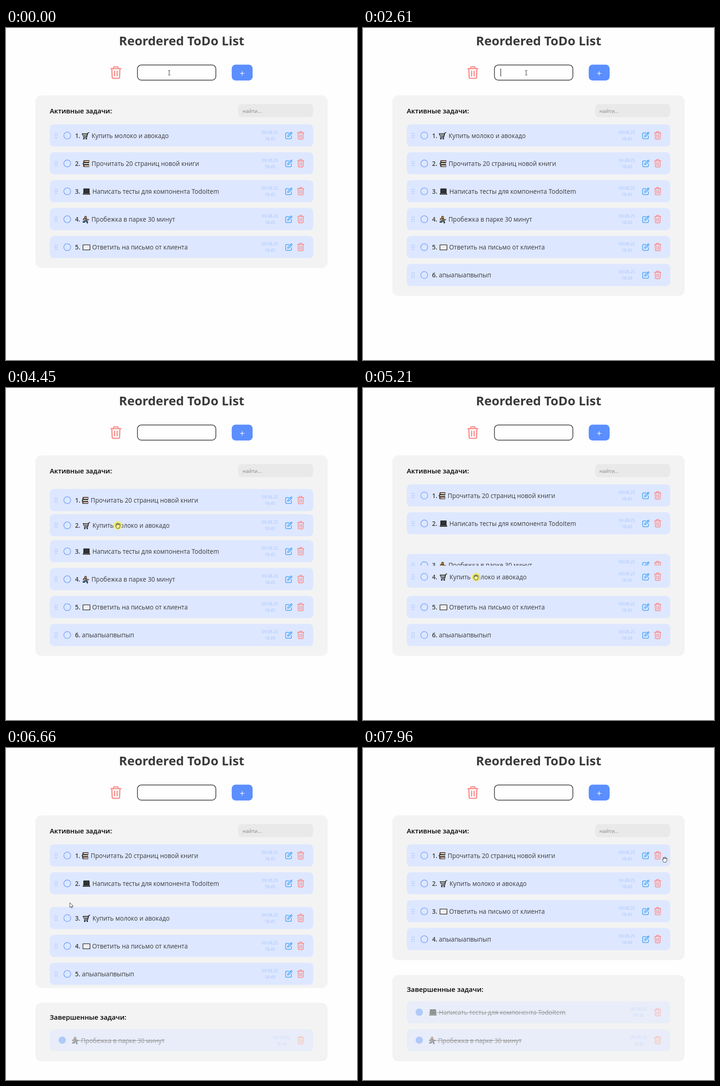
These frames come from a looping animation (770 by 727 pixels, 8 s). An HTML page with a canvas:

```html
<!DOCTYPE html>
<html lang="ru">
<head>
<meta charset="utf-8">
<title>Reordered ToDo List</title>
<style>
html, body { margin: 0; width: 100%; height: 100%; overflow: hidden; background: #fefefe; }
canvas { display: block; width: 770px; height: 727px; }
</style>
</head>
<body>
<canvas id="stage"></canvas>
<script>
const W = 770, H = 727, LOOP = 8000;
const canvas = document.getElementById('stage');
const ctx = canvas.getContext('2d');
const dpr = window.devicePixelRatio || 1;
canvas.width = W * dpr;
canvas.height = H * dpr;

const FAMILY = '"Open Sans", "Noto Sans", sans-serif';
const INK = '#3a3a3a', BLUE = '#5b8fff', RED = '#fb8f8f', PANEL = '#f3f3f3', ROW = '#dde7ff';
const ROW_H = 48.4, PITCH = 61.1, TOP = 147;
const TYPED = 'апыапыапвыпып';

const ADD = 2610, GRAB = 3900, DROP = 5550, SETTLED = 5850;
const SWAPS = [4214, 4680, 5061], CHECK_RUN = 6452, CHECK_TESTS = 7330;

// moves: [time, new slot]
const tasks = [
  { name: 'Купить молоко и авокадо', icon: cart, gap: 21.8, slot: 0, drag: true,
    moves: [[SWAPS[0], 1], [SWAPS[1], 2], [SWAPS[2], 3], [CHECK_RUN, 2], [CHECK_TESTS, 1]] },
  { name: 'Прочитать 20 страниц новой книги', icon: books, gap: 19.8, slot: 1, moves: [[SWAPS[0], 0]] },
  { name: 'Написать тесты для компонента TodoItem', icon: laptop, gap: 21.4, slot: 2,
    moves: [[SWAPS[1], 1]], done: CHECK_TESTS },
  { name: 'Пробежка в парке 30 минут', icon: runner, gap: 19.4, slot: 3,
    moves: [[SWAPS[2], 2]], done: CHECK_RUN, bin: '#fb9f84' },
  { name: 'Ответить на письмо от клиента', icon: envelope, gap: 21, slot: 4,
    moves: [[CHECK_RUN, 3], [CHECK_TESTS, 2]] },
  { name: TYPED, gap: -1.6, slot: 5, added: ADD, clock: '18:49',
    moves: [[CHECK_RUN, 4], [CHECK_TESTS, 3]] }
];

const dragPath = [[GRAB, 211], [4030, 224.5], [4217, 248], [4443, 276.3], [4870, 338],
  [5202, 389], [5320, 401], [DROP, 402]];
const pointerPath = [[3270, 358, 98], [3780, 245, 236], [GRAB, 245, 236], [4030, 245, 249.5],
  [4443, 245.5, 301], [5202, 248, 414], [5320, 248, 426], [5620, 248, 427], [5900, 150, 385],
  [6100, 150, 385], [6340, 135, 358], [CHECK_RUN, 135, 357], [6651, 139.5, 338.5], [6870, 136, 305],
  [7000, 135, 298], [7200, 135, 298], [CHECK_TESTS, 142, 296], [7479, 337.5, 287], [7960, 662, 244]];

function track(keys, t) {
  if (t <= keys[0][0]) return keys[0].slice(1);
  for (let i = 1; i < keys.length; i++) {
    const a = keys[i - 1], b = keys[i];
    if (t < b[0]) {
      const p = (t - a[0]) / (b[0] - a[0]);
      return a.slice(1).map((v, k) => v + (b[k + 1] - v) * p);
    }
  }
  return keys[keys.length - 1].slice(1);
}

// cubic-bezier(.4, 0, .1, 1)
function ease(x) {
  if (x <= 0) return 0;
  if (x >= 1) return 1;
  let lo = 0, hi = 1, s = 0.5;
  for (let i = 0; i < 24; i++) {
    s = (lo + hi) / 2;
    const u = 1 - s;
    if (1.2 * u * u * s + 0.3 * u * s * s + s * s * s < x) lo = s; else hi = s;
  }
  return s * s * (3 - 2 * s);
}

const slotY = slot => 211 + slot * PITCH;

function place(task, t) {
  let slot = task.slot, y = slotY(slot);
  for (const [start, next] of task.moves) {
    if (t < start) break;
    y = slotY(slot) + (slotY(next) - slotY(slot)) * ease((t - start) / 450);
    slot = next;
  }
  if (task.drag && t < SETTLED) {
    y = track(dragPath, t)[0];
    if (t > DROP) y += (slotY(slot) - y) * ease((t - DROP) / (SETTLED - DROP));
  }
  return { slot, y };
}

function box(x, y, w, h, r, fill) {
  ctx.beginPath();
  ctx.roundRect(x, y, w, h, r);
  ctx.fillStyle = fill;
  ctx.fill();
}

function text(str, x, y, size, color, weight = 400, align = 'left') {
  ctx.font = `${weight} ${size}px ${FAMILY}`;
  ctx.textAlign = align;
  ctx.fillStyle = color;
  ctx.fillText(str, x, y);
}

function dot(x, y, r, fill) {
  ctx.beginPath();
  ctx.arc(x, y, r, 0, Math.PI * 2);
  ctx.fillStyle = fill;
  ctx.fill();
}

function shape(d, stroke, width = 1, fill) {
  const path = new Path2D(d);
  if (fill) { ctx.fillStyle = fill; ctx.fill(path); }
  if (stroke) { ctx.strokeStyle = stroke; ctx.lineWidth = width; ctx.stroke(path); }
}

function at(x, y, draw, scale = 1) {
  ctx.save();
  ctx.translate(x, y);
  ctx.scale(scale, scale);
  ctx.lineCap = ctx.lineJoin = 'round';
  draw();
  ctx.restore();
}

function trash(color = RED) {
  shape('M-7 -5.5H7M-3.8 -5.6L-2.5 -8.1H2.5L3.8 -5.6M-5.7 -5.3L-5.2 6.3Q-5.1 8.1 -3.4 8.1H3.4Q5.1 8.1 5.2 6.3L5.7 -5.3M-1.8 -2V4.8M1.8 -2V4.8', color, 1.7);
}

function pencil() {
  shape('M0 -5.6H-4.6Q-7 -5.6 -7 -3.2V5Q-7 7.4 -4.6 7.4H3.4Q5.7 7.4 5.7 5V1M-2.6 2.9L-1.9 -.3L4.4 -6.6Q5.4 -7.5 6.5 -6.5T6.6 -4.4L.4 2Z M3 -5.2L5.2 -3', '#47a3f7', 1.5);
}

// Task icons, each in a 16 x 16 cell
function cart() {
  shape('M1 3.5H13L11.3 9H3.4Z', '#222', 1.3, '#777');
  shape('M4.2 4V8.6M7 4V8.6M9.8 4V8.6M2 6.2H12', '#ddd', 0.7);
  shape('M16 1L13.6 1.8L11 11.8H3.6', '#222', 1.5);
  dot(4.8, 14.4, 1.6, '#222');
  dot(10.2, 14.4, 1.6, '#222');
}

function books() {
  [['#c4643a', 2.2], ['#6c8a5e', 0.8], ['#c4643a', 1.8]].forEach(([color, x], i) => {
    const y = 1.2 + i * 4.7;
    shape(`M${x + 12} ${y}H${x + 1}Q${x - 0.8} ${y + 2} ${x + 1} ${y + 4}H${x + 12}Z`, '#1c1c1c', 1.3, color);
    shape(`M${x + 3} ${y + 2.2}H${x + 11.6}`, '#fff', 1.7);
  });
}

function laptop() {
  shape('M2.5 2H14.5V10H2.5Z', '#1c1c1c', 1.5, '#30343a');
  shape('M2.4 10.5H14.6L16.2 14H.8Z', '#1c1c1c', 1.1, '#77797c');
  shape('M3 12.2H14', '#222', 0.8);
}

function runner() {
  shape('M7 5L6.4 9.5L9.4 11.5L10.4 15M6 9.5L4.6 13L1.6 13.4', '#222', 3.2);
  shape('M7.2 5.5L6.6 9.2', '#d98a3a', 2.6);
  shape('M6.5 5.4L3 6L1.8 8.6M8 6L10 8.2L13 8.4', '#222', 2.6);
  shape('M6.5 5.4L3 6L1.8 8.6M8 6L10 8.2L13 8.4', '#e9a45c', 1);
  shape('M6.4 10L9.4 11.6L10.2 14.6M6 10L4.6 12.8L2 13.2', '#4582b8', 1.2);
  dot(6.6, 2.8, 2.6, '#222');
  dot(6.7, 3.1, 1.6, '#e9a45c');
}

function envelope() {
  shape('M.8 2.5H16.2V13.5H.8Z', '#222', 1.3, '#f6f6f6');
  shape('M1.6 3.2L8.5 8.6L15.4 3.2', '#cfcfcf', 0.8);
}

function stamp(x, y, clock = '18:45') {
  text('09.08.25', x, y + 20.8, 9.1, '#a6c4fc', 400, 'center');
  text(clock, x, y + 34.8, 9.1, '#a6c4fc', 400, 'center');
}

function activeRow(task, slot, y) {
  const mid = y + ROW_H / 2, left = slot ? 168 : 166;
  box(96, y, 578, ROW_H, 9, ROW);
  for (let i = 0; i < 6; i++) dot(107.6 + (i % 2) * 4.2, mid - 4 + (i >> 1) * 4.4, 0.9, '#83abfb');
  ctx.beginPath();
  ctx.arc(134.4, mid + 0.3, 7.6, 0, Math.PI * 2);
  ctx.strokeStyle = '#6d9efa';
  ctx.lineWidth = 1.3;
  ctx.stroke();
  text(slot + 1 + '.', 151.5, y + 29.8, 13.6, INK, 600);
  if (task.icon) at(left, y + 17, task.icon);
  text(task.name, left + task.gap, y + 29.8, 13.6, INK);
  stamp(579, y, task.clock);
  at(620.5, mid, pencil);
  at(646.5, mid, trash);
}

function doneRow(task, y) {
  box(96, y, 578, ROW_H, 9, ROW);
  dot(123.4, y + 24, 8, '#6ba2ff');
  at(145, y + 16.5, task.icon);
  text(task.name, 145 + task.gap, y + 29.8, 13.6, INK);
  ctx.fillRect(144.5, y + 24.4, task.gap + ctx.measureText(task.name).width + 0.5, 1);
  stamp(604.5, y);
  at(646.5, y + 24, () => trash(task.bin));
  // half-fade the whole row into its panel
  ctx.globalAlpha = 0.5;
  box(95, y - 1, 580, ROW_H + 2, 9, PANEL);
  ctx.globalAlpha = 1;
}

function header(t) {
  text('Reordered ToDo List', 385.2, 37.8, 27.5, INK, 700, 'center');
  at(241, 97.6, trash, 1.56);
  ctx.beginPath();
  ctx.roundRect(288.4, 80.9, 172, 33.4, 8.5);
  ctx.fillStyle = '#fff';
  ctx.fill();
  ctx.strokeStyle = '#333';
  ctx.lineWidth = 1.5;
  ctx.stroke();
  box(495.2, 80.3, 45.8, 34.6, 8.5, BLUE);
  ctx.fillStyle = '#fff';
  ctx.fillRect(513.6, 98.8, 9, 1.2);
  ctx.fillRect(517.5, 94.9, 1.2, 9);

  let caretX = 301.6;
  if (t >= 1460 && t < ADD) {
    const typed = TYPED.slice(0, Math.floor((t - 1460) / 61.6) + 1);
    text(typed, 302, 101.8, 12.25, INK);
    caretX += ctx.measureText(typed).width;
  }
  const caret = (t >= 590 && t < 1130) || (t >= 1460 && t < 2740) || (t >= 3270 && t < 3800);
  if (caret) {
    ctx.fillStyle = '#222';
    ctx.fillRect(caretX, 89, 1.2, 17);
  }
}

function pointer(t, rows) {
  const [x, y] = track(pointerPath, t);
  const overRow = x > 96 && x < 674 && rows.some(r => y >= r.y && y <= r.y + ROW_H);
  const inInput = x > 288 && x < 461 && y > 80 && y < 115;
  const pressed = t >= 3850 && t < DROP;
  if (pressed) {
    ctx.globalAlpha = 0.9;
    dot(x, y, 9.3, '#f0ea62');
    ctx.globalAlpha = 1;
  }
  at(x, y, () => {
    if (inInput) {
      shape('M-2 -5H-.6L0 -4.4L.6 -5H2M0 -4.4V4.4M-2 5H-.6L0 4.4L.6 5H2', '#333', 1);
    } else if (overRow) {
      shape('M-2.6 5.8L-5 1.6Q-5.8 0 -4.5 -.4L-3 .8L-4 -3Q-3.7 -4.6 -2.5 -3.9L-1.6 -1L-1.5 -4.6Q-.6 -6 .3 -4.6L.6 -1.2L1.4 -4.3Q2.5 -5.3 3 -3.9L2.8 -.8L3.8 -2.6Q5 -3.2 5.1 -1.8L4.2 2.6L3 5.8Z', '#222', 0.8, pressed ? '#f7f29a' : '#fff');
    } else {
      shape('M.5 .5V10.6L2.9 8.4L4.5 12L6.1 11.3L4.6 7.8H7.8Z', '#333', 0.9, '#fff');
    }
  });
}

function draw(t) {
  // pointer and drag motion advance in short even steps
  const m = 3270 + Math.floor((t - 3270 + 12) / 69) * 69;
  ctx.setTransform(dpr, 0, 0, dpr, 0, 0);
  ctx.fillStyle = '#fefefe';
  ctx.fillRect(0, 0, W, H);
  header(t);

  const done = tasks.filter(task => task.done && m >= task.done);
  const rows = tasks
    .filter(task => !done.includes(task) && t >= (task.added || 0))
    .map(task => ({ task, ...place(task, m) }))
    .sort((a, b) => (a.task.drag ? 1 : 0) - (b.task.drag ? 1 : 0));

  const bottom = slotY(rows.length) + 9;
  box(64.4, TOP + 0.4, 641.2, bottom - TOP - 0.4, 13, PANEL);
  text('Активные задачи:', 96, 187.2, 14.85, '#000', 600);
  box(509.5, 166.4, 164.3, 28.8, 8, '#e9e9e9');
  text('найти...', 518.8, 185.5, 11.4, '#858585');

  if (done.length) {
    const top = bottom + 32.5;
    box(64.4, top, 641.2, 67.2 + done.length * PITCH, 13, PANEL);
    text('Завершенные задачи:', 96, top + 37, 14.85, '#000', 600);
    done.forEach((task, i) => doneRow(task, top + 57.7 + i * PITCH));
  }
  rows.forEach(r => activeRow(r.task, r.slot, r.y));
  pointer(m, rows);
}

const begin = performance.now();
function tick() {
  draw((performance.now() - begin) % LOOP);
  requestAnimationFrame(tick);
}
tick();
</script>
</body>
</html>
```
